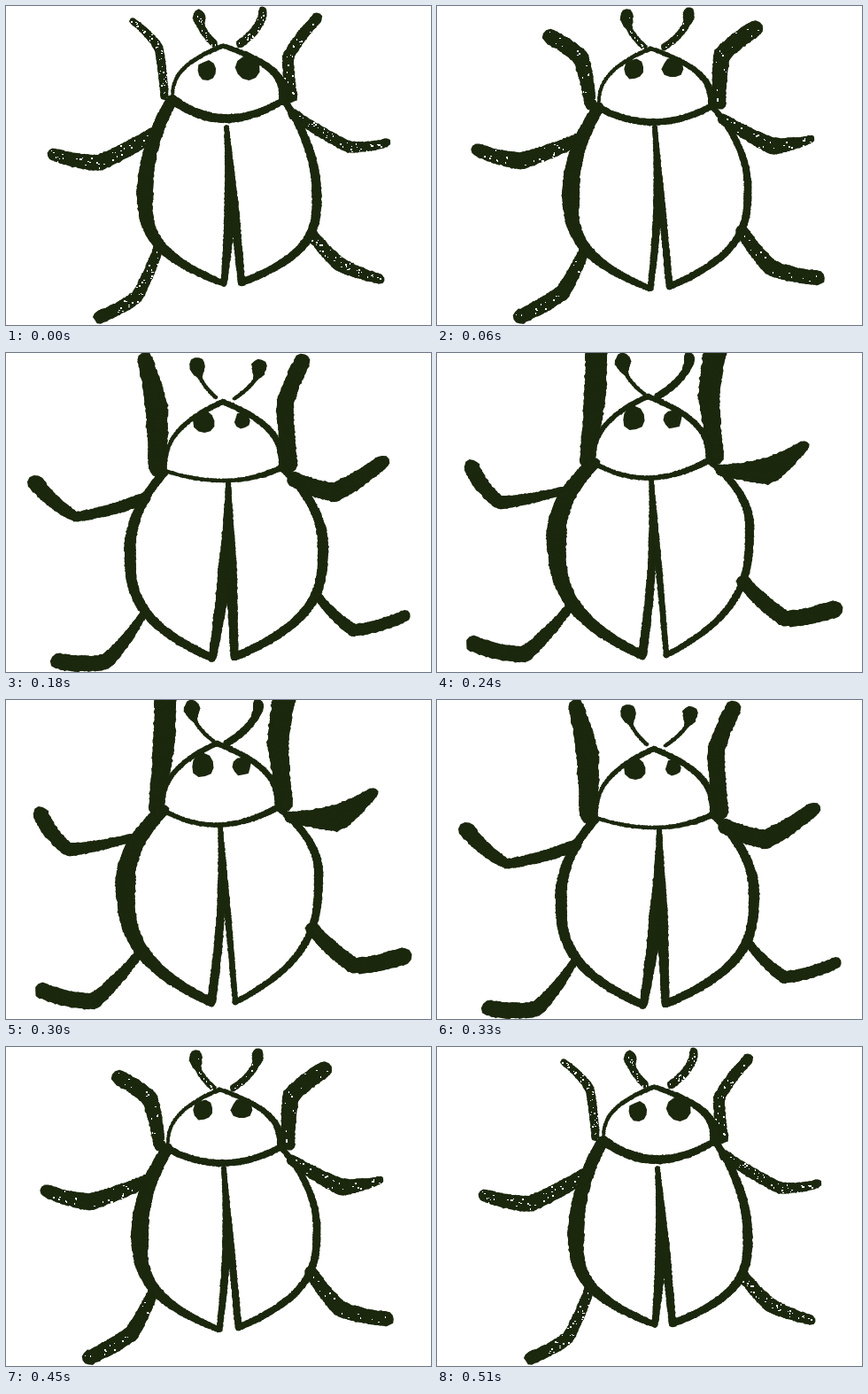
An HTML page with a canvas that plays this animation: 480x360 px, repeating every 0.54 s.

```html
<!DOCTYPE html>
<html lang="en">
<head>
<meta charset="utf-8">
<title>Beetle</title>
<style>
html, body { margin: 0; width: 100%; height: 100%; overflow: hidden; background: #fff; }
canvas { display: block; }
</style>
</head>
<body>
<canvas id="stage" width="480" height="360"></canvas>
<script>
const ctx = document.getElementById('stage').getContext('2d');
const INK = '#1c280e';
const LOOP = 540;

// Key points are [x, y, brush width]. A leg is [tip, knee, hip width].
// Everything else about the beetle follows from these.
const tucked = {
  grain: 1,
  left: [188, 105, 3], right: [314, 106, 12], top: [245, 45, 5], collar: [248, 127, 10],
  sides: [[157, 212, 19], [351, 215, 11]],
  tails: [[246, 313, 7], [266, 312, 8]],
  seam: [249, 137, 13],
  eyes: [[227, 73, 22], [273, 70, 29]],
  antennae: [[[218, 11, 14], [236, 43, 8]], [[290, 5, 9], [264, 43, 9]]],
  front: [[[143, 17, 7], [172, 46, 10], 9], [[351, 14, 12], [319, 56, 13], 13]],
  middle: [[[53, 167, 14], [105, 177, 18], 16], [[430, 154, 9], [387, 159, 13], 12]],
  rear: [[[106, 351, 15], [148, 328, 14], 11], [[422, 308, 11], [377, 292, 16], 13]]
};
const spread = {
  grain: 0,
  left: [177, 124, 3], right: [307, 120, 6], top: [238, 51, 4], collar: [243, 135, 5],
  sides: [[145, 212, 21], [351, 195, 6]],
  tails: [[236, 325, 6], [259, 321, 7]],
  seam: [243, 137, 6],
  eyes: [[219, 70, 24], [260, 69, 20]],
  antennae: [[[210, 11, 17], [233, 50, 5]], [[279, 11, 17], [249, 50, 6]]],
  front: [[[113, 53, 28], [153, 71, 27], 16], [[368, 37, 25], [325, 55, 26], 15]],
  middle: [[[39, 158, 16], [85, 173, 20], 12], [[414, 146, 8], [370, 157, 25], 11]],
  rear: [[[82, 350, 19], [135, 319, 21], 12], [[438, 306, 22], [378, 300, 20], 15]]
};
const raised = {
  grain: 0,
  left: [180, 133, 3], right: [312, 129, 8], top: [245, 55, 6], collar: [250, 144, 4],
  sides: [[140, 222, 13], [358, 218, 12]],
  tails: [[233, 344, 9], [258, 343, 9]],
  seam: [251, 146, 16],
  eyes: [[224, 78, 25], [267, 76, 18]],
  antennae: [[[216, 13, 18], [238, 51, 4]], [[286, 15, 17], [257, 52, 4]]],
  front: [[[157, 7, 17], [170, 62, 26], 20], [[335, 9, 18], [315, 57, 20], 17]],
  middle: [[[34, 147, 19], [79, 185, 11], 14], [[425, 123, 16], [372, 157, 22], 17]],
  rear: [[[60, 348, 19], [114, 348, 17], 8], [[450, 297, 13], [392, 313, 14], 9]]
};
const stretched = {
  grain: 0,
  left: [177, 124, 4], right: [307, 121, 7], top: [238, 49, 6], collar: [240, 141, 5],
  sides: [[135, 205, 23], [353, 195, 10]],
  tails: [[232, 341, 10], [259, 341, 6]],
  seam: [242, 142, 9],
  eyes: [[222, 74, 27], [266, 75, 21]],
  antennae: [[[210, 9, 18], [235, 47, 4]], [[285, 5, 12], [249, 49, 8]]],
  front: [[[180, -5, 25], [178, 55, 25], 14], [[315, -4, 26], [307, 48, 24], 17]],
  middle: [[[39, 129, 18], [71, 169, 15], 8], [[414, 105, 12], [374, 133, 30], 12]],
  rear: [[[41, 328, 18], [99, 340, 18], 9], [[448, 289, 20], [393, 300, 18], 16]]
};

const lerp = (a, b, t) => a + (b - a) * t;

// Blends two poses, however deeply nested.
function mix(a, b, t) {
  if (typeof a === 'number') return lerp(a, b, t);
  if (Array.isArray(a)) return a.map((item, i) => mix(item, b[i], t));
  return Object.fromEntries(Object.keys(a).map(key => [key, mix(a[key], b[key], t)]));
}

const poses = [
  tucked, mix(tucked, spread, 0.5), spread, raised, stretched, mix(raised, stretched, 1.25)
];
const starts = [0, 60, 120, 180, 240, 270, 300, 330, 390, 450, 510];

function seeded(seed) {
  return () => {
    seed = (seed * 1664525 + 1013904223) >>> 0;
    return seed / 4294967296;
  };
}

// A curve that leaves `from` vertically and leans over towards `to`.
const bend = (from, to, power) => t => [
  lerp(from[0], to[0], t ** power), lerp(from[1], to[1], t), lerp(from[2], to[2], t)
];

// A path through three points: 0 is angular, 1 a parabola.
const through = (a, b, c, roundness) => t => {
  const line = k => t < 0.5 ? lerp(a[k], b[k], t * 2) : lerp(b[k], c[k], t * 2 - 1);
  const arc = k => a[k] * (1 - t) * (1 - 2 * t) + 4 * b[k] * t * (1 - t) + c[k] * t * (2 * t - 1);
  return [lerp(line(0), arc(0), roundness), lerp(line(1), arc(1), roundness), line(2)];
};

// A round knob that narrows quickly into a stalk.
const antenna = ([tip, base]) => t => {
  const [x, y] = bend(tip, base, 2)(t);
  const taper = Math.max(0, 1 - t / 0.45);
  return [x, y, lerp(base[2], tip[2], taper * taper * (3 - 2 * taper))];
};

function stamp([x, y, width], random) {
  const corners = 11;
  const turn = random();
  ctx.beginPath();
  for (let i = 0; i < corners; i++) {
    const angle = (i + turn) / corners * 2 * Math.PI;
    const radius = Math.max(1, width / 2 * (0.84 + random() * 0.2) + random() * 0.9);
    ctx.lineTo(x + Math.cos(angle) * radius, y + Math.sin(angle) * radius);
  }
  ctx.fill();
}

function brush(path, random, grain = 0) {
  const dots = [];
  let last = [-99, -99];
  for (let i = 0; i <= 400; i++) {
    const dot = path(i / 400);
    if (Math.hypot(dot[0] - last[0], dot[1] - last[1]) >= 1.7) dots.push(last = dot);
  }
  ctx.fillStyle = INK;
  for (const dot of dots) stamp(dot, random);
  // Dry-brush flecks
  ctx.fillStyle = '#fff';
  for (const [x, y, width] of dots) {
    if (random() > grain * 0.6) continue;
    const angle = random() * 2 * Math.PI;
    const reach = width * (0.15 + random() * 0.35);
    ctx.fillRect(Math.round(x + Math.cos(angle) * reach), Math.round(y + Math.sin(angle) * reach),
      1 + Math.round(random()), 1 + Math.round(random()));
  }
}

function draw(index) {
  const pose = poses[index];
  const random = seeded(71 + index * 97);
  const line = (path, grain) => brush(path, random, grain);
  ctx.fillStyle = '#fff';
  ctx.fillRect(0, 0, 480, 360);

  [pose.left, pose.right].forEach((corner, i) => {
    const side = pose.sides[i];
    const tail = pose.tails[i];
    const upper = bend(side, [corner[0], corner[1], side[2] * 0.6 + 1], 2);
    const lower = bend(side, tail, 3);
    const hips = {
      front: [corner[0] + (i ? 9 : -9), corner[1] - 2],
      middle: upper(i ? 0.85 : 0.65),
      rear: lower(i ? 0.43 : 0.57)
    };
    for (const name in hips) {
      const [tip, knee, width] = pose[name][i];
      const [x, y] = hips[name];
      line(through(tip, knee, [x, y, width], 0.35), pose.grain);
    }
    line(antenna(pose.antennae[i]), pose.grain);
    line(upper);
    line(lower);
    line(bend(corner, pose.top, 2.7));

    const [x, y, width] = pose.seam;
    const middle = [(x + tail[0]) / 2 + (i ? 0 : 5.5), (y + tail[1]) / 2, i ? width * 0.8 : width];
    line(through([x, y, 5], middle, tail, 0.6));
    line(() => pose.eyes[i]);
  });

  const [left, right] = [pose.left, pose.right];
  line(through([left[0], left[1], pose.collar[2]], pose.collar, [right[0], right[1], 7], 1));
}

let shown = -1;
function tick() {
  const time = performance.now() % LOOP;
  const slot = starts.filter(start => start <= time).length - 1;
  const index = Math.min(slot, starts.length - 1 - slot); // there and back
  if (index !== shown) draw(shown = index);
  requestAnimationFrame(tick);
}
tick();
</script>
</body>
</html>
```
